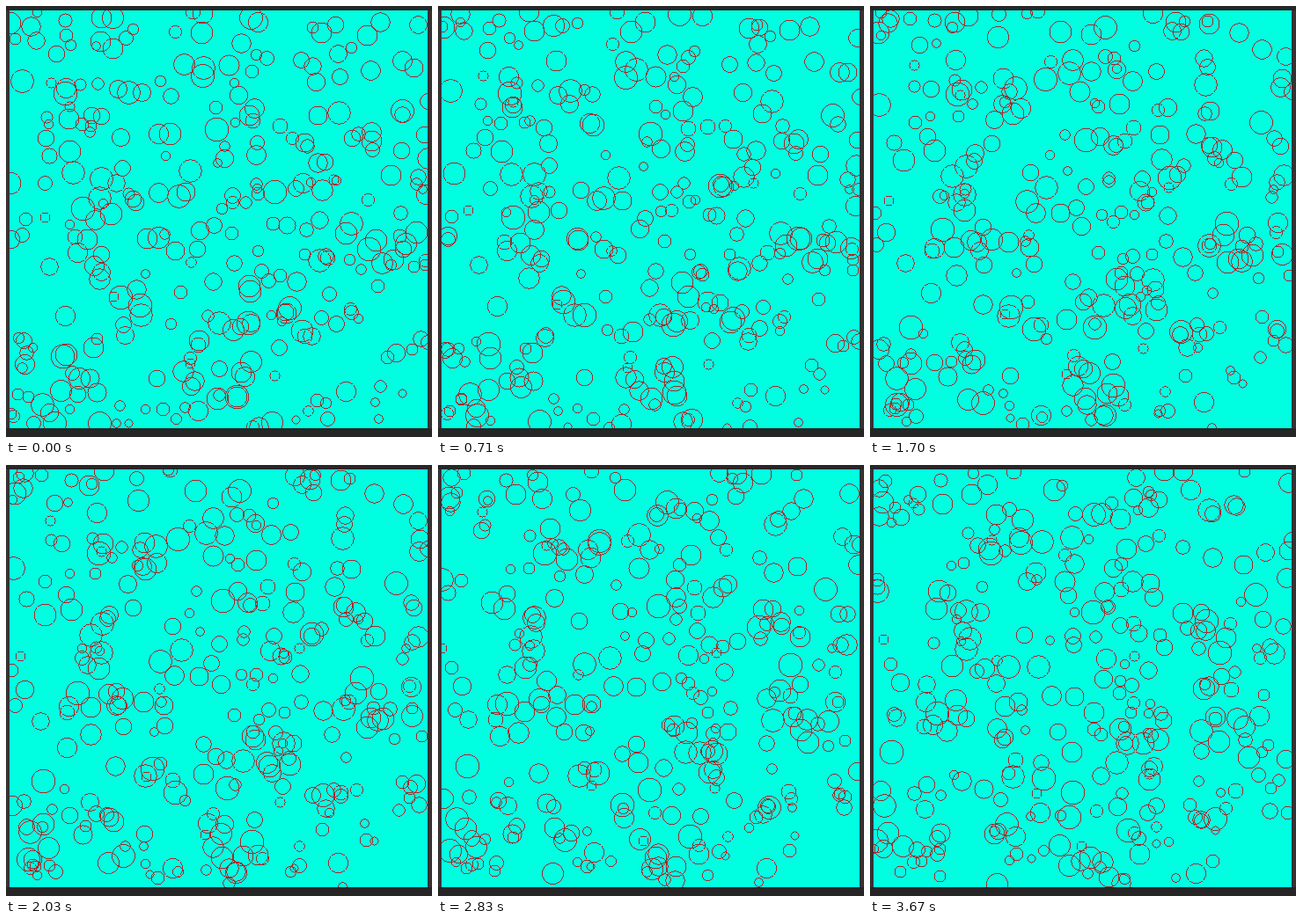
Animation, 484 px wide and 490 px high, one loop 3700 ms. Source, as an HTML page with a canvas:

```html
<!DOCTYPE html>
<html lang="en">
<head>
<meta charset="utf-8">
<title>Drifting circles</title>
<style>
  html, body { margin: 0; width: 100%; height: 100%; overflow: hidden; background: #262626; }
  canvas { display: block; }
</style>
</head>
<body>
<canvas id="stage" width="484" height="490"></canvas>
<script>
const ctx = document.getElementById('stage').getContext('2d');
const LOOP = 3700, FIRST_STEP = 20, STEP = 46.79, STEPS = 79;
const LEFT = 4, TOP = 5, SIZE = 475, COUNT = 300;

let seed = 7321;
function random(min, max) {
  seed = (seed * 16807) % 2147483647;
  return min + (max - min) * seed / 2147483647;
}

const circles = Array.from({ length: COUNT }, () => ({
  x: random(0, SIZE), y: random(0, SIZE),
  vx: random(-1, 1), vy: random(-1, 1),
  r: random(4.5, 13.5)
}));

// Reflects a centre off the walls of the square
function bounce(p) {
  const q = Math.abs(p) % (2 * SIZE);
  return q > SIZE ? 2 * SIZE - q : q;
}

// Hairline circle without antialiasing, one pixel per octant step
function hairline(cx, cy, r) {
  const x = Math.round(cx), y = Math.round(cy);
  for (let a = 0; a <= r * Math.SQRT1_2; a++) {
    const b = Math.round(Math.sqrt(r * r - a * a));
    for (const [dx, dy] of [[a, b], [b, a]]) {
      ctx.fillRect(x + dx, y + dy, 1, 1);
      ctx.fillRect(x - dx, y + dy, 1, 1);
      ctx.fillRect(x + dx, y - dy, 1, 1);
      ctx.fillRect(x - dx, y - dy, 1, 1);
    }
  }
}

function draw(step) {
  ctx.fillStyle = '#262626';
  ctx.fillRect(0, 0, 484, 490);
  ctx.fillStyle = '#333333';
  ctx.fillRect(0, TOP, 484, SIZE);
  ctx.save();
  ctx.translate(LEFT, TOP);
  ctx.beginPath();
  ctx.rect(0, 0, SIZE, SIZE);
  ctx.clip();
  ctx.fillStyle = '#00ffe1';
  ctx.fillRect(0, 0, SIZE, SIZE);
  ctx.fillStyle = '#a82828';
  for (const { x, y, vx, vy, r } of circles) {
    hairline(bounce(x + vx * step), bounce(y + vy * step), r);
  }
  ctx.restore();
}

function stepAt(time) {
  if (time < FIRST_STEP) return 0;
  return Math.min(STEPS, Math.floor((time - FIRST_STEP) / STEP) + 1);
}

let shown = -1;
function tick() {
  const step = stepAt(performance.now() % LOOP);
  if (step !== shown) draw(shown = step);
  requestAnimationFrame(tick);
}
tick();
</script>
</body>
</html>
```
